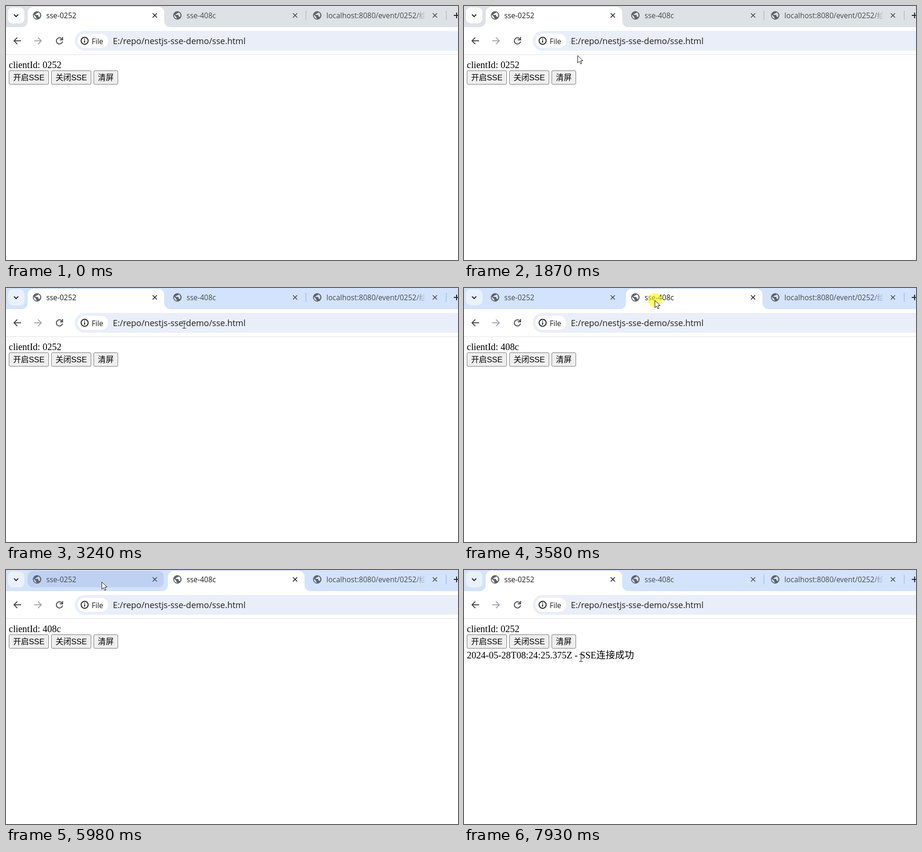
Write an HTML page that moves like this. It is 960 by 540 pixels and loops after 7990 ms.

```html
<!DOCTYPE html>
<html lang="zh">
<head>
<meta charset="utf-8">
<title>SSE demo</title>
<style>
  html, body { margin: 0; width: 100%; height: 100%; overflow: hidden; background: #fff; }
  svg { display: block; width: 960px; height: 540px; }
  text { white-space: pre; }
  .ui { font: 15.5px "Open Sans", "Noto Sans", "Noto Sans CJK SC", "Noto Sans CJK", sans-serif; }
  .url { font-size: 18.05px; fill: #1f1f1f; }
  .page { font: 20px "Liberation Serif", "Noto Sans CJK SC", "Noto Sans CJK", serif; }
  .btn text { font: 16.67px "Liberation Sans", "Noto Sans CJK SC", "Noto Sans CJK", sans-serif; }
  .btn rect { fill: #efefef; stroke: #767676; }
  .btn.over rect { fill: #e5e5e5; stroke: #4f4f4f; }
  .line { fill: none; stroke: #1f1f1f; stroke-width: 2; }
  .tab { color: #45494f; }
  .tab.on { color: #1f1f1f; }
  .tab text { fill: currentColor; }
  .tab:last-child text { fill: url(#fade); }
  .tab .line { stroke: currentColor; stroke-width: 1.7; }
  .tab .back, .tab .pill { visibility: hidden; }
  .tab.on .back, .tab.over .pill { visibility: visible; }
  .back { fill: #fff; }
  #strip { fill: #dee1e6; }
  #menu { fill: #fff; }
  .pill { fill: #c8cbd1; }
  .sep { fill: #bfc2c8; }
  .focus #strip { fill: #d3e3fd; }
  .focus #menu { fill: #eaf1fe; }
  .focus .pill { fill: #bfd1f3; }
  .focus .sep { fill: #a8c7fa; }
</style>
</head>
<body>
<svg id="stage" viewBox="0 0 960 540">
  <defs>
    <linearGradient id="fade" gradientUnits="userSpaceOnUse" x1="870" x2="891" y1="0" y2="0">
      <stop offset="0" stop-color="#45494f"/>
      <stop offset="1" stop-color="#45494f" stop-opacity="0"/>
    </linearGradient>
    <path id="globe" fill="#5f6368" fill-rule="evenodd" d="M-9 0a9 9 0 0 1 18 0a9 9 0 0 1-18 0zM-7-1.5l4.3 4.2q.2 2.7 1.8 2.7v1.7a7.2 7.2 0 0 1-6.1-8.6zM2.7-6.7q0 2.2-3.6 2.2q0 1.8-2.7 1.8v1.8h5.4q.9 0 .9 3.5q2 0 2.6 1.3a7.2 7.2 0 0 0-2.6-10.6z"/>
  </defs>
  <rect width="960" height="540" fill="#fff"/>
  <rect id="strip" width="960" height="45"/>
  <rect id="menu" x="4" y="3" width="35" height="34" rx="10"/>
  <path class="line" d="M17 18l4.5 4.5L26 18"/>
  <g id="tabs" class="ui"></g>
  <rect id="sep" class="sep" x="636" y="10" width="2" height="20" rx="1"/>
  <rect class="sep" x="934" y="10" width="2" height="20" rx="1"/>
  <path class="line" d="M951 20h9M957 14v12"/>

  <path class="line" style="stroke:#474747" d="M32 74H17M24 67l-7 7 7 7"/>
  <path class="line" style="stroke:#a3a6aa" d="M60 74h15M68 67l7 7-7 7"/>
  <path class="line" style="stroke:#474747" d="M119 70.5A6.6 6.6 0 1 0 120 75.5M120.2 66v6h-6"/>
  <rect x="146" y="53" width="860" height="42" rx="21" fill="#eaeef8"/>
  <rect x="152" y="59" width="65" height="30" rx="15" fill="#fff"/>
  <circle class="line" cx="167" cy="74" r="7.5"/>
  <path class="line" d="M167 73v5M167 69.5v2"/>
  <text class="ui" x="182" y="81" fill="#1f1f1f">File</text>
  <text class="ui url" x="227" y="81">E:/repo/nestjs-sse-demo/sse.html</text>
  <rect y="103" width="960" height="1" fill="#dfe1e5"/>

  <text id="client" class="page" x="6" y="132"></text>
  <g id="buttons"></g>
  <text id="log" class="page" x="6" y="188">2024-05-28T08:24:25.375Z - SSE连接成功</text>

  <circle id="ring" r="15" fill="#ff0" fill-opacity=".58"/>
  <g id="pointer">
    <path id="arrow" fill="#fff" stroke="#111" d="M.5.5V16l3.7-3.5 2.5 5.8 2.5-1.1-2.4-5.7h4.8z"/>
    <path id="beam" fill="none" stroke="#222" d="M-3.5-7.5h8M.5-7.5v15M-3.5 7.5h8"/>
  </g>
</svg>
<script>
const LOOP = 7990, STEP = 70, PRESS = 140;

// Clicks on the page, second tab, text, first tab and connect button
const FOCUS = 2830, TO_SECOND = 3510, ON_TEXT = 5160, TO_FIRST = 6050, CONNECT = 6760;
const CLICKS = [FOCUS, TO_SECOND, ON_TEXT, TO_FIRST, CONNECT];

// Pointer moves: start time, end time, target x, y, sideways bow
const ENTRY = { x: 893, y: 510 };
const MOVES = [
  [130, 270, 691, 370],
  [400, 1240, 352, 22, -110],
  [1240, 1930, 240, 109, 40],
  [2140, 2630, 334, 163],
  [2960, 3440, 405, 26],
  [3650, 4630, 109, 114, -120],
  [5300, 5700, 470, 100],
  [5700, 6000, 200, 24],
  [6180, 6530, 69, 172],
  [6620, 6760, 56, 150],
  [6900, 7380, 294, 205, 50],
  [7380, 7860, 248, 187]
];

const TABS = ["sse-0252", "sse-408c", "localhost:8080/event/0252/绘"];
const BUTTONS = ["开启SSE", "关闭SSE", "清屏"];

const $ = id => document.getElementById(id);
const show = (el, on) => el.setAttribute("visibility", on ? "visible" : "hidden");
const move = (el, x, y) => el.setAttribute("transform", `translate(${x} ${y})`);
const inside = (p, x0, y0, x1, y1) => p && p.x >= x0 && p.x < x1 && p.y >= y0 && p.y < y1;
const tabX = i => Math.round(46 + 297.5 * i);

$("tabs").innerHTML = TABS.map((label, i) => `
  <g class="tab" transform="translate(${tabX(i)})">
    <path class="back" d="M-13 45a13 13 0 0 0 13-13V14a12 12 0 0 1 12-12h266a12 12 0 0 1 12 12v18a13 13 0 0 0 13 13z"/>
    <rect class="pill" y="2" width="289" height="35" rx="11"/>
    <use href="#globe" x="20" y="20"/>
    <text x="39.5" y="26">${label}</text>
    <path class="line" d="M265.5 15.5l9 9m0-9l-9 9"/>
  </g>`).join("");
$("fade").setAttribute("gradientTransform", `translate(${-tabX(2)})`);

$("buttons").innerHTML = BUTTONS.map(label => `
  <g class="btn"><rect y="137.5" height="29" rx="2.5"/><text y="158" text-anchor="middle">${label}</text></g>`).join("");

const tabs = [...document.querySelectorAll(".tab")];
let nextX = 6;
const buttons = [...document.querySelectorAll(".btn")].map(el => {
  const [box, text] = el.children;
  const x = Math.round(nextX), w = Math.round(text.getComputedTextLength() + 18.8);
  box.setAttribute("x", x + .5);
  box.setAttribute("width", w - 1);
  text.setAttribute("x", x + w / 2);
  nextX += w + 4.8;
  return { el, x, w };
});

function pointerAt(t) {
  const i = MOVES.findLastIndex(m => m[0] <= t);
  if (i < 0) return null;
  const [from, to, x, y, bow = 0] = MOVES[i];
  const [x0, y0] = i ? MOVES[i - 1].slice(2) : [ENTRY.x, ENTRY.y];
  const linear = Math.min(1, Math.floor((t - from) / STEP) * STEP / (to - from));
  const k = t >= to ? 1 : linear * linear * (3 - 2 * linear);
  const dx = x - x0, dy = y - y0;
  const side = bow * Math.sin(Math.PI * k) / Math.hypot(dx, dy);
  return { x: Math.round(x0 + dx * k - dy * side), y: Math.round(y0 + dy * k + dx * side) };
}

function draw(t) {
  const p = pointerAt(t);
  const active = t >= TO_SECOND && t < TO_FIRST ? 1 : 0;
  const logged = t >= CONNECT + PRESS;

  $("stage").classList.toggle("focus", t >= FOCUS);
  const hovered = TABS.findIndex((_, i) => inside(p, tabX(i), 2, tabX(i) + 290, 38));
  tabs.forEach((tab, i) => {
    tab.classList.toggle("on", i === active);
    tab.classList.toggle("over", i === hovered && i !== active);
  });
  show($("sep"), active !== 1 && hovered < 1);

  buttons.forEach(({ el, x, w }) => el.classList.toggle("over", !!inside(p, x, 137, x + w, 167)));
  $("client").textContent = "clientId: " + (active ? "408c" : "0252");
  show($("log"), logged);

  const overText = inside(p, 6, 112, 118, 137) || inside(p, 218, 53, 960, 95) ||
    logged && inside(p, 6, 171, 361, 194);
  show($("ring"), CLICKS.some(at => t >= at && t < at + PRESS));
  show($("arrow"), p && !overText);
  show($("beam"), p && overText);
  if (p) {
    move($("pointer"), p.x, p.y);
    move($("ring"), overText ? p.x - 2 : p.x, p.y);
  }
}

const start = performance.now();
function tick() {
  draw((performance.now() - start) % LOOP);
  requestAnimationFrame(tick);
}
tick();
</script>
</body>
</html>
```
